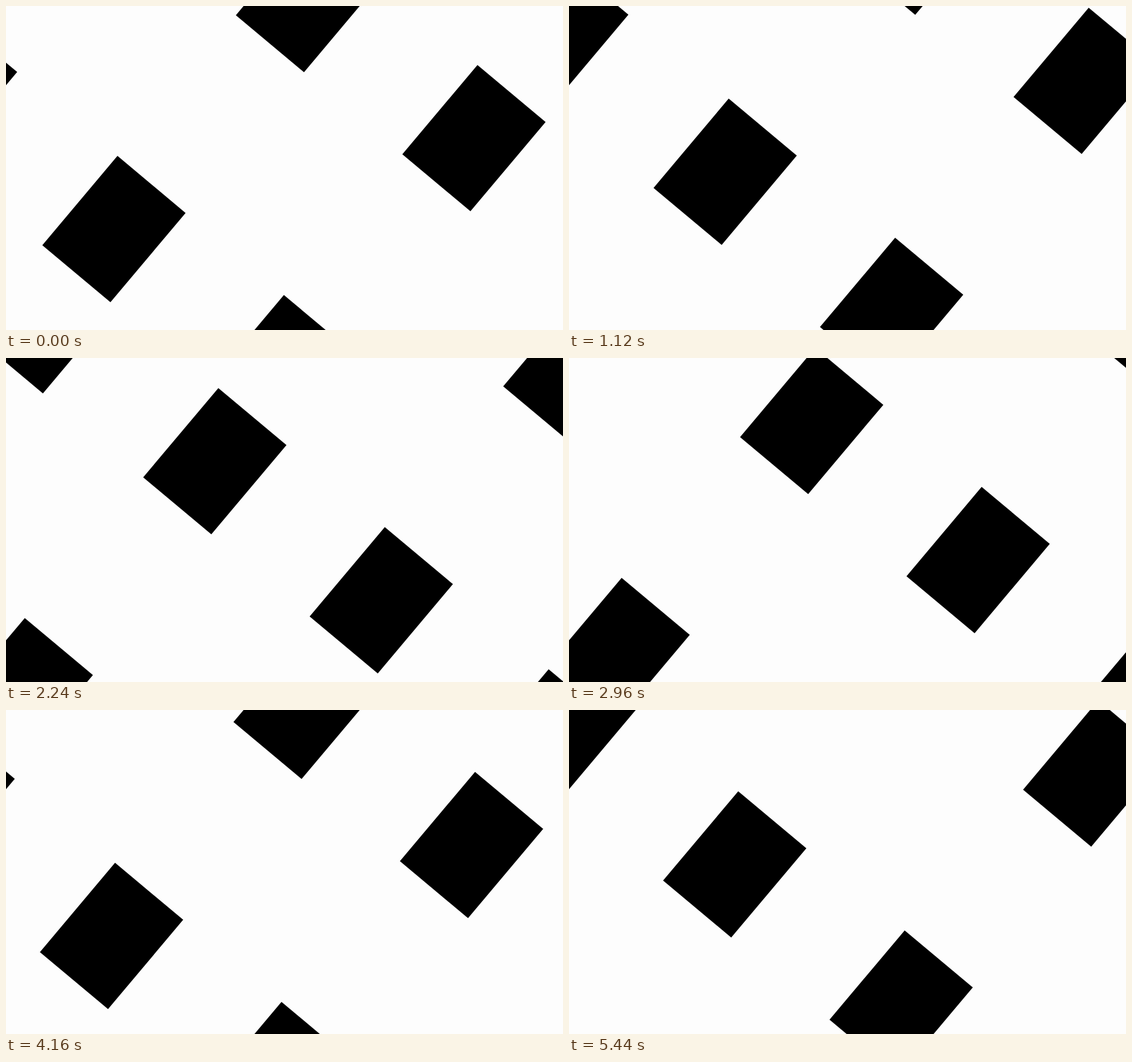
An HTML page that plays this animation: 960x560 px, repeating every 5.52 s.

```html
<!DOCTYPE html>
<html lang="en">
<head>
<meta charset="utf-8">
<title>Drifting blocks</title>
<style>
  html, body { margin: 0; width: 100%; height: 100%; overflow: hidden; background: #fdfdfd; }
  svg { display: block; width: 960px; height: 560px; }
</style>
</head>
<body>
<svg viewBox="0 0 960 560">
  <g transform="rotate(40)"><g id="blocks"></g></g>
</svg>
<script>
  const STEP = 80, STEPS = 69;
  const GAP = 519;                  // distance between blocks in a lane
  const WIDTH = 153.3, HEIGHT = 201.5;
  const LANES = [                   // x and y offset in the rotated plane
    [-65.2, 0], [313.7, 0], [688, -0.2], [1062.2, 6.4]
  ];
  const SPEED = 10.085;             // pixels per step
  const START = 75, RAMP = 8, RAMP_END = 6.2;

  const blocks = document.getElementById('blocks');

  for (const [x, y] of LANES) {
    for (let row = -3; row <= 1; row++) {
      const rect = document.createElementNS('http://www.w3.org/2000/svg', 'rect');
      const attrs = { x, y: y + row * GAP, width: WIDTH, height: HEIGHT };
      for (const name in attrs) rect.setAttribute(name, attrs[name]);
      blocks.append(rect);
    }
  }

  // The drift starts a little slower, then keeps a steady speed.
  function offset(step) {
    return step < RAMP
      ? START + (RAMP_END - START) * step / RAMP
      : RAMP_END - SPEED * (step - RAMP);
  }

  function draw(now) {
    const step = Math.floor(now / STEP) % STEPS;
    const y = ((offset(step) % GAP) + GAP) % GAP;
    blocks.setAttribute('transform', `translate(0 ${y.toFixed(2)})`);
  }

  const start = performance.now();
  function tick() {
    draw(performance.now() - start);
    requestAnimationFrame(tick);
  }
  tick();
</script>
</body>
</html>
```
